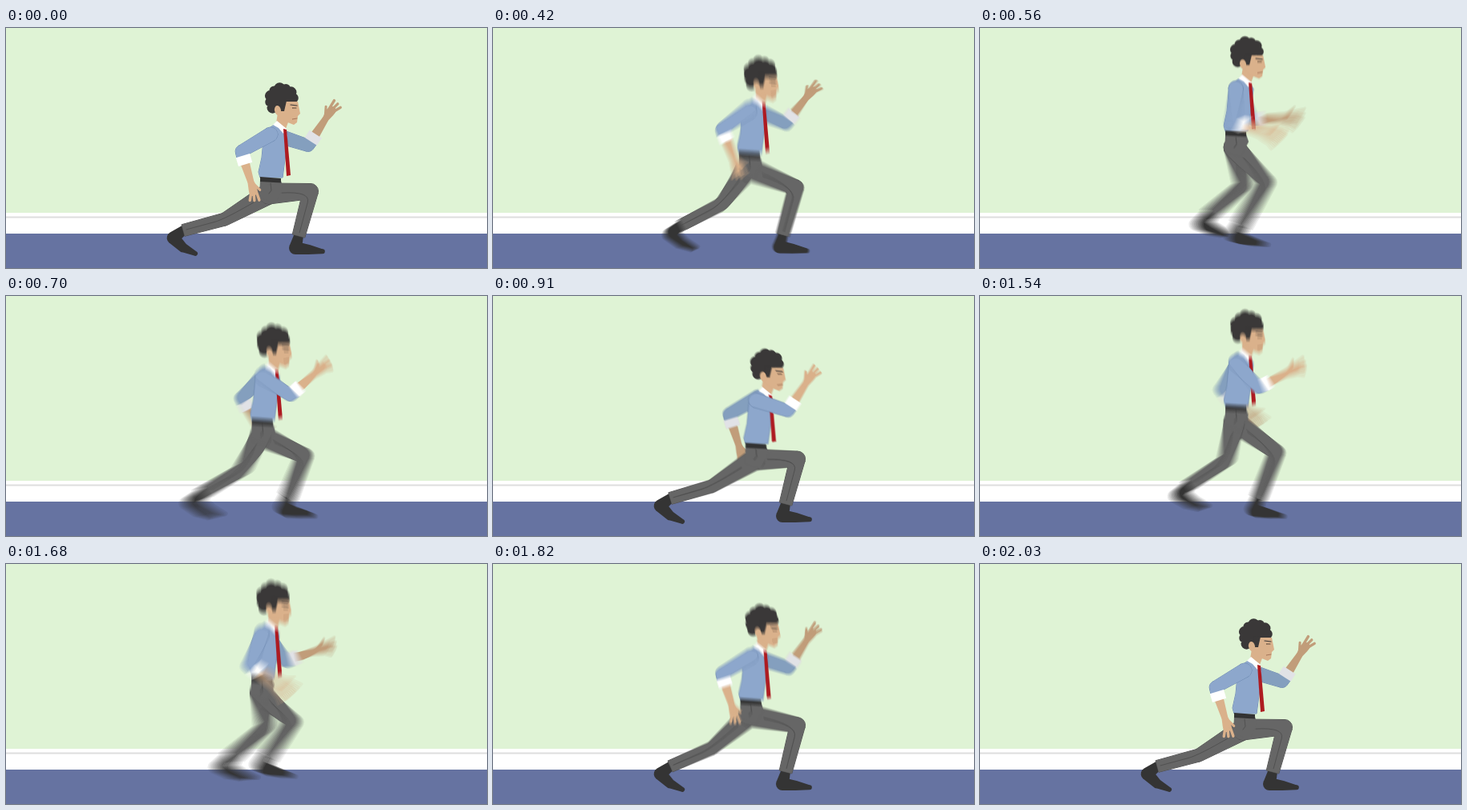
These frames come from a looping animation (600x300 px, 2170 ms). An HTML page with a canvas:

```html
<!DOCTYPE html>
<html lang="en">
<head>
<meta charset="utf-8">
<title>Jumping lunges</title>
<style>
html, body { margin: 0; width: 100%; height: 100%; overflow: hidden; }
canvas { display: block; width: 600px; height: 300px; }
</style>
</head>
<body>
<canvas id="stage" width="600" height="300"></canvas>
<script>
const LOOP = 2170, STEP = 70, SWITCH = 1050, SECOND_JUMP = 1040;
const TAKEOFF = 213, APEX = 590, LANDED = 975;
const SHUTTER = 36, SAMPLES = 12;
const UPPER_ARM = 42, FOREARM = 40;
const C = {
  wall: '#dff3d5', skirting: '#ffffff', groove: '#dedede', floor: '#6673a1',
  shirt: '#8da7cc', farShirt: '#849fbe', shirtLine: '#6c88b0',
  pants: '#666666', pantsLine: '#4c4c4c', shoe: '#343434',
  skin: '#dab18b', farSkin: '#c19d7a', hair: '#3a3838',
  cuff: '#ffffff', farCuff: '#e1e2e6', tie: '#ae1b21', belt: '#333333'
};

const screen = document.getElementById('stage').getContext('2d');
const buffer = document.createElement('canvas');
buffer.width = 600;
buffer.height = 300;
const g = buffer.getContext('2d');

const mix = (a, b, k) => a + (b - a) * k;
const rad = degrees => degrees * Math.PI / 180;
const progress = (u, from, to) => Math.min(1, Math.max(0, (u - from) / (to - from)));
const smooth = x => x * x * (3 - 2 * x);
const polar = ([x, y], angle, length) => [x + Math.cos(angle) * length, y + Math.sin(angle) * length];

function place(x, y, angle, draw) {
  g.save();
  g.translate(x, y);
  g.rotate(angle);
  draw();
  g.restore();
}

function paint(color, line) {
  if (line) {
    g.strokeStyle = line;
    g.lineWidth = 1;
    g.stroke();
  }
  g.fillStyle = color;
  g.fill();
}

function polygon(points, color, line) {
  g.beginPath();
  points.forEach(p => g.lineTo(...p));
  g.closePath();
  paint(color, line);
}

function stroke(points, color, width) {
  g.beginPath();
  points.forEach(p => g.lineTo(...p));
  g.strokeStyle = color;
  g.lineWidth = width;
  g.lineCap = g.lineJoin = 'round';
  g.stroke();
}

function disc(x, y, r) {
  g.moveTo(x + r, y);
  g.arc(x, y, r, 0, 7);
}

// Tapered limb through [x, y, radius] joints.
function limb(joints, color, { line, roundEnd } = {}) {
  g.beginPath();
  joints.forEach(([x, y, r], i) => {
    const next = joints[i + 1];
    if (next || roundEnd) disc(x, y, r);
    if (!next) return;
    const [x2, y2, r2] = next;
    const length = Math.hypot(x2 - x, y2 - y);
    const nx = (y2 - y) / length, ny = (x - x2) / length;
    g.moveTo(x + nx * r, y + ny * r);
    g.lineTo(x2 + nx * r2, y2 + ny * r2);
    g.lineTo(x2 - nx * r2, y2 - ny * r2);
    g.lineTo(x - nx * r, y - ny * r);
    g.closePath();
  });
  paint(color, line);
}

function drawRoom() {
  const band = (y, h, color) => { g.fillStyle = color; g.fillRect(0, y, 600, h); };
  band(0, 231, C.wall);
  band(231, 26, C.skirting);
  band(235.5, 2, C.groove);
  band(257, 43, C.floor);
}

function drawFoot(x, y, bend) {
  place(x, y, rad(38 * bend), () => {
    const ball = [13, 17];
    const toe = polar(ball, rad(8 - 20 * bend), 17);
    limb([[0, 0, 6], [-4, 15, 8], [...ball, 6], [...toe, 3]], C.shoe, { roundEnd: true });
  });
}

// front runs from 0 (leg stretched back) to 1 (leg bent in front).
function drawLeg(front, step, dx, dy) {
  const hip = [328 + dx, 207 + dy];
  const arc = Math.sin(Math.PI * front);
  const knee = [mix(273, 380, front) + 8 * arc, mix(239, 204, front) + dy * (.5 - .35 * front ** 3)];
  const ankle = [mix(221, 365, front), mix(253, 260, front) - step * arc];
  drawFoot(...ankle, 1 - front);
  limb([[...hip, 13], [...knee, mix(8, 9.5, front)], [...ankle, mix(7.5, 8, front)]], C.pants, { line: C.pantsLine });

  const between = (a, b, k) => [mix(a[0], b[0], k), mix(a[1], b[1], k)];
  g.beginPath();
  g.moveTo(...between(hip, knee, .3));
  g.quadraticCurveTo(...knee, ...between(knee, ankle, .25));
  g.lineTo(...between(knee, ankle, .93));
  g.strokeStyle = C.pantsLine;
  g.lineWidth = .8;
  g.stroke();
}

function drawHand(skin) {
  limb([[0, 0, 4], [9, 0, 5.5], [13, 1, 5]], skin, { roundEnd: true });
  stroke([[4, -3], [13, -8]], skin, 3);
  for (let i = -1; i <= 1; i++) {
    stroke([[12, i * 3], polar([12, i * 3], rad(12 + i * 14), 12 - i)], skin, 3.4);
  }
}

// front runs from 0 (arm behind the back) to 1 (hand raised in front).
function drawArm(front, far) {
  const skin = far ? C.farSkin : C.skin;
  const shoulder = far ? [mix(333, 337, front), mix(129, 134, front)] : [330, 133];
  const elbow = polar(shoulder, rad(mix(150, 18, front)), UPPER_ARM);
  const angle = rad(mix(73, -57, front));
  const wrist = polar(elbow, angle, FOREARM);
  limb([[...polar(elbow, angle, 12), 6], [...wrist, 4]], skin);
  place(...wrist, angle, () => drawHand(skin));
  limb([[...shoulder, 9], [...elbow, 7.5], [...polar(elbow, angle, 8), 8]],
    far ? C.farShirt : C.shirt, { line: C.shirtLine });
  place(...elbow, angle, () => {
    polygon([[6, -9], [17, -9], [17, 9], [6, 9]], far ? C.farCuff : C.cuff);
  });
}

function drawHead() {
  polygon([[339, 106], [353, 115], [349, 126], [337, 119]], C.skin);
  g.beginPath();
  disc(342, 90, 13);
  for (let i = 0; i < 8; i++) {
    const [x, y] = polar([344, 90], rad(-10 - 30 * i), 15);
    disc(x, y, 6 + i % 2);
  }
  paint(C.hair);
  polygon([[347, 92], [364, 92], [367, 107], [364, 110], [363, 118], [359, 121], [349, 117], [338, 108]], C.skin);
  polygon([[341, 90], [350, 91], [347, 104], [342, 104]], C.hair);
  g.beginPath();
  g.ellipse(339, 103, 4, 6, -.2, 0, 7);
  paint(C.skin);
  stroke([[355, 96], [363, 97]], C.hair, 1.2);
  stroke([[357, 100], [362, 100]], '#5a4638', 1);
  stroke([[357, 114], [363, 113]], '#a8775b', 1);
}

function drawTorso() {
  polygon([[317, 191], [343, 191], [346, 200], [336, 219], [316, 212]], C.pants);
  stroke([[330, 194], [331, 203], [328, 207]], C.pantsLine, .8);
  polygon([[334, 121], [346, 124], [352, 134], [345, 187], [317, 187], [315, 180], [319, 162], [322, 130]],
    C.shirt, C.shirtLine);
  polygon([[317, 186], [343, 188], [343, 193.5], [317, 192]], C.belt);
}

function drawCollar() {
  polygon([[333, 121], [338, 116], [350, 126], [346, 132], [340, 125]], C.cuff);
  polygon([[346, 126], [350, 127], [355, 184], [350, 185]], C.tie);
}

function jumpHeight(u) {
  const up = progress(u, TAKEOFF, APEX), down = progress(u, APEX, LANDED);
  return 59 * (down ? (1 - down) ** 1.8 : (1 - Math.cos(Math.PI * up ** 1.1)) / 2);
}

function drawScene(t) {
  const second = t >= SWITCH;
  const u = second ? t - SECOND_JUMP : t;
  const dy = -jumpHeight(u);
  const dx = -11 * (1 - Math.exp(dy / 12));
  const onBody = draw => place(dx, dy, 0, draw);

  const stride = progress(u, 280, 770);
  const legs = [
    () => drawLeg(smooth(stride ** 1.35), 24, dx, dy),
    () => drawLeg(1 - smooth(stride ** 1.9), 15, dx, dy)
  ];
  if (second) legs.reverse();
  const swing = smooth(progress(u, 370, 790));
  const nearArm = second ? 1 - swing : swing;

  drawRoom();
  onBody(() => drawArm(1 - nearArm, true));
  legs.forEach(draw => draw());
  onBody(() => {
    drawTorso();
    drawHead();
    drawCollar();
    drawArm(nearArm, false);
  });
}

const start = performance.now();

function frame() {
  const t = Math.floor((performance.now() - start) % LOOP / STEP) * STEP;
  const u = t >= SWITCH ? t - SECOND_JUMP : t;
  const count = u > TAKEOFF && u < LANDED ? SAMPLES : 1;
  // Motion blur: running average over the shutter time.
  for (let i = 0; i < count; i++) {
    drawScene(t + (count > 1 ? (i / (count - 1) - .5) * SHUTTER : 0));
    screen.globalAlpha = 1 / (i + 1);
    screen.drawImage(buffer, 0, 0);
  }
  requestAnimationFrame(frame);
}

frame();
</script>
</body>
</html>
```
